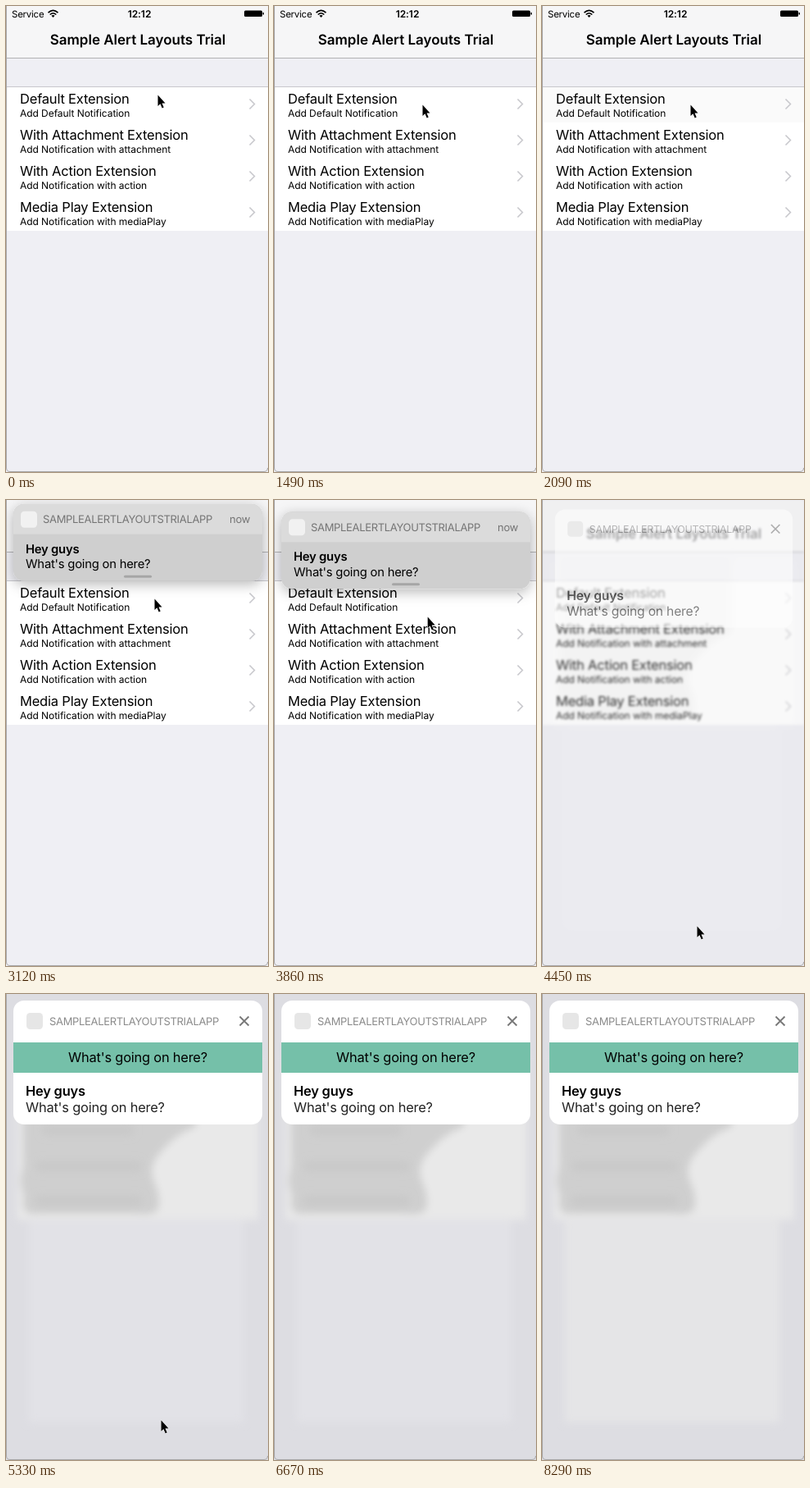
An HTML page that plays this animation: 320x568 px, repeating every 8360 ms.

```html
<!DOCTYPE html>
<html lang="en">
<head>
<meta charset="utf-8">
<title>Notification banner</title>
<style>
  html, body { margin: 0; width: 100%; height: 100%; overflow: hidden; background: #efeff4; }
  svg { display: block; width: 320px; height: 568px; font-family: Inter, "Liberation Sans", sans-serif; text-rendering: geometricPrecision; }
  .title { font-size: 16.5px; letter-spacing: -.2px; }
  .sub { font-size: 12px; letter-spacing: -.06px; }
  .status { font-size: 11.5px; letter-spacing: -.25px; }
  .nav { font-size: 17px; font-weight: 600; letter-spacing: 0; }
  .app { font-size: 13px; letter-spacing: -.33px; }
  .small { font-size: 14.8px; letter-spacing: -.22px; }
  .body { font-size: 16.4px; letter-spacing: -.2px; }
  .bold { font-weight: 600; }
  .mid { text-anchor: middle; }
</style>
</head>
<body>
<svg viewBox="0 0 320 568">
  <defs>
    <filter id="soft" x="-20%" y="-20%" width="140%" height="140%"><feGaussianBlur stdDeviation="5"/></filter>
    <filter id="shade" x="-20%" y="-40%" width="140%" height="200%">
      <feDropShadow dx="0" dy="4" stdDeviation="8" flood-opacity=".28"/>
    </filter>
    <clipPath id="bannerShape"><rect x="9" y="8" width="304" height="94" rx="13"/></clipPath>
  </defs>

  <g id="page">
    <rect width="320" height="568" fill="#efeff4"/>
    <rect width="320" height="63" fill="#f6f6f7"/>
    <rect y="63" width="320" height="1" fill="#b2b2b4"/>
    <rect y="98" width="320" height="176" fill="#fff"/>
    <rect id="tapRow" y="98" width="320" height="44"/>
    <rect y="98" width="320" height="1" fill="#c8c7cc"/>
    <text class="nav mid" x="161" y="47">Sample Alert Layouts Trial</text>
    <g id="rows"></g>
  </g>

  <g id="status">
    <text class="status" x="7" y="13.5">Service</text>
    <g fill="none" stroke="#000" stroke-width="1.6">
      <path d="M51.5 8.2Q57.5 2.6 63.5 8.2M53.7 10.5Q57.5 7 61.3 10.5"/>
      <path d="M55.4 11.8Q57.5 10 59.6 11.8L57.5 14Z" fill="#000" stroke="none"/>
    </g>
    <text class="sub bold mid" x="163" y="13.5">12:12</text>
    <rect x="291" y="5.5" width="22" height="7.5" rx="1.5"/>
    <rect x="313.6" y="7.8" width="1.4" height="3" rx=".7"/>
  </g>

  <g id="backdrop">
    <rect width="320" height="568" fill="#dddde2"/>
    <g filter="url(#soft)">
      <rect id="lower" x="28" y="276" width="262" height="246"/>
      <rect x="14" y="75" width="294" height="200" fill="#e9e9e9"/>
      <path d="M20 70H232V162Q208 170 190 192Q174 208 180 226Q190 248 186 262Q180 271 160 268H30Q18 266 22 245Q14 228 21 212Z" fill="#cfcfcf"/>
    </g>
    <path d="M50 166H150M42 210H160M42 252H160" stroke="#c9c9c9" stroke-width="13" stroke-linecap="round" filter="url(#soft)"/>
  </g>

  <g id="banner">
    <rect x="9" y="8" width="304" height="94" rx="13" fill="#cfcfcf" filter="url(#shade)"/>
    <rect x="9" y="8" width="304" height="37" fill="#dbdbdb" clip-path="url(#bannerShape)"/>
    <rect x="18" y="17" width="20" height="20" rx="4.5" fill="#f1f1f1"/>
    <g class="app" fill="#747474">
      <text x="45" y="31.5">SAMPLEALERTLAYOUTSTRIALAPP</text>
      <text x="298" y="31.5" text-anchor="end">now</text>
    </g>
    <text class="small bold" x="24" y="68">Hey guys</text>
    <text class="small" x="24" y="86.5">What's going on here?</text>
    <rect x="144" y="95" width="34" height="3" rx="1.5" fill="#a6a6a6"/>
  </g>

  <g id="card">
    <rect x="9" y="8" width="304" height="151" rx="13" fill="#fff"/>
    <rect x="25" y="23" width="20" height="20" rx="4.5" fill="#e6e6e6"/>
    <text class="app" x="53" y="38" fill="#8a8a8a">SAMPLEALERTLAYOUTSTRIALAPP</text>
    <path d="M285.5 27.5l11 11m0-11l-11 11" stroke="#777" stroke-width="1.8"/>
    <g id="strip">
      <rect x="9" y="59" width="304" height="37" fill="#75c0a9"/>
      <text class="body mid" x="161" y="83">What's going on here?</text>
    </g>
    <text class="body bold" x="24" y="124">Hey guys</text>
    <text class="body" x="24" y="144" fill="#222">What's going on here?</text>
  </g>

  <path d="M.5 0V563Q.5 567.5 5 567.5H315Q319.5 567.5 319.5 563" fill="none" stroke="#a9a9ab"/>
  <path id="cursor" d="M.5 .5V14L3.4 11.3L5.7 16.5L7.7 15.6L5.5 10.5H9.5Z" stroke="#fff" paint-order="stroke"/>
</svg>

<script>
const LOOP = 8360;
const TICK = 148; // the picture is held for one tick at a time
const el = id => document.getElementById(id);
const mix = (a, b, p) => a + (b - a) * p;
const progress = (t, from, to) => Math.min(1, Math.max(0, (t - from) / (to - from)));
const smooth = p => p * p * (3 - 2 * p);
const easeOut = p => 1 - (1 - p) ** 3;

const cursorMoves = [
  { from: 0, to: 148, x: 183, y: 99 },
  { from: 148, to: 440, x: 181, y: 120 },
  { from: 3200, to: 3700, x: 187, y: 100 },
  { from: 3740, to: 4290, x: 189, y: 519 },
  { from: 5920, to: 6800, x: 246, y: 572 }
];

function cursorAt(t) {
  let x = 185, y = 108;
  for (const move of cursorMoves) {
    const p = smooth(progress(t, move.from, move.to));
    x = mix(x, move.x, p);
    y = mix(y, move.y, p);
  }
  return [x, y];
}

el('rows').innerHTML = [
  ['Default Extension', 'Add Default Notification'],
  ['With Attachment Extension', 'Add Notification with attachment'],
  ['With Action Extension', 'Add Notification with action'],
  ['Media Play Extension', 'Add Notification with mediaPlay']
].map(([title, sub], i) => `<g transform="translate(0 ${98 + 44 * i})">
  <text class="title" x="17" y="21.3">${title}</text>
  <text class="sub" x="17" y="37.3">${sub}</text>
  <path d="M297.5 15.5l6 6-6 6" fill="none" stroke="#c7c7cc" stroke-width="1.5"/>
</g>`).join('');

function draw(time) {
  const t = Math.floor(time / TICK) * TICK;
  el('cursor').setAttribute('transform', `translate(${cursorAt(t)})`);

  const tapped = t > 1620 && t < 2800;
  el('tapRow').style.opacity = tapped ? mix(.15, .02, progress(t, 1700, 2060)) : 0;
  el('status').style.opacity = t < 2800 ? 1 : 0;

  const slide = mix(-140, 0, easeOut(progress(t, 2680, 3280)));
  const pull = mix(0, 30, smooth(progress(t, 3700, 4200)));
  el('banner').setAttribute('transform', `translate(0 ${slide + pull})`);
  el('banner').style.opacity = 1 - progress(t, 3860, 4280);

  const blur = progress(t, 4300, 4900);
  el('page').style.filter = blur ? `blur(${6 * blur}px)` : 'none';
  el('backdrop').style.opacity = blur;
  el('lower').setAttribute('fill', t < 8280 ? '#e2e2e7' : '#e5e5e7');

  const open = easeOut(progress(t, 4300, 4900));
  el('card').style.opacity = open;
  el('card').setAttribute('transform', `translate(161 83) scale(${mix(.9, 1, open)}) translate(-161 -83)`);
  el('strip').style.opacity = t > 5320 ? 1 : 0;
}

const start = performance.now();
function tick() {
  draw((performance.now() - start) % LOOP);
  requestAnimationFrame(tick);
}
tick();
</script>
</body>
</html>
```
